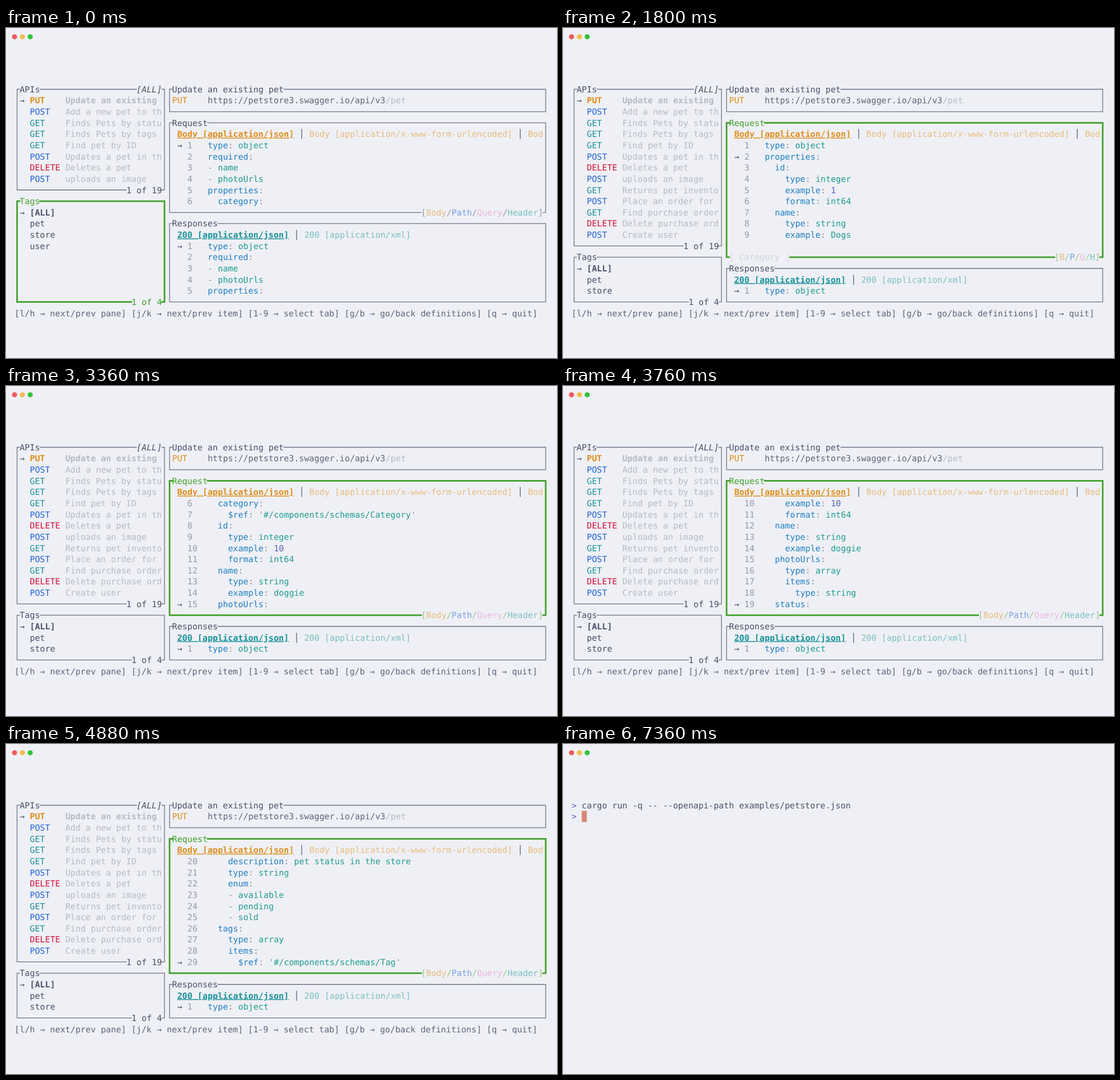
Recreate the animation shown at these times as an HTML page. Size 967 px wide and 579 px high, loop 7.44 s.

```html
<!DOCTYPE html>
<html lang="en">
<head>
<meta charset="utf-8">
<title>OpenAPI terminal browser</title>
<style>
  html, body { margin: 0; width: 100%; height: 100%; overflow: hidden; background: #eff0f5; }
  svg { display: block; width: 967px; height: 579px; }
  text {
    font: 14.816px "DejaVu Sans Mono", monospace;
    white-space: pre;
    text-rendering: geometricPrecision;
  }
  .b { font-weight: bold; }
  .i { font-style: italic; }
  .u { font-weight: bold; text-decoration: underline; }
  path { fill: none; }
</style>
</head>
<body>
<svg viewBox="0 0 967 579">
  <circle cx="15" cy="15.4" r="4.5" fill="#ee5c5a"/>
  <circle cx="28.8" cy="15.4" r="4.5" fill="#f2bd4c"/>
  <circle cx="42.5" cy="15.4" r="4.5" fill="#2fc43c"/>
  <g id="screen"></g>
</svg>
<script>
const LOOP = 7440;
const C = {
  text: '#4c4f69', sub: '#5f627a', line: '#6f7288', dim: '#b7b9c5', num: '#9799a8',
  green: '#40a02b', orange: '#df8e1d', blue: '#2062d8', teal: '#179299', red: '#d20f39',
  key: '#1f80c4', value: '#1f9c90', digit: '#5a63b4', punct: '#7f8c98',
  orangeDim: '#e7bb7c', blueDim: '#769fe2', pinkDim: '#e9b4df', tealDim: '#78bfc1',
  greenDim: '#93c888', grayDim: '#9698a8', ghost: '#d0d2dc', ghostPink: '#e6cfe4',
  prompt: '#5f57bd', cursor: '#d98a78'
};

// Terminal grid
const X = col => +(15 + col * 8.92).toFixed(2);
const Y = row => +(107.5 + row * 19.64).toFixed(2);
const put = (col, row, str, fill = C.text, cls = '') =>
  `<text x="${X(col)}" y="${(Y(row) + 5.3).toFixed(2)}" fill="${fill}" class="${cls}">${str}</text>`;

// Puts [text, colour, class] parts one after the other
function run(col, row, parts) {
  let out = '';
  for (const [str, fill, cls] of parts) {
    if (str) out += put(col, row, str, fill, cls);
    col += str.length;
  }
  return out;
}

const size = parts => parts.reduce((n, p) => n + p[0].length, 0);

// Frame with text set into its edges
function box(c0, r0, c1, r1, title, focus, { top = [], left = [], right = [] } = {}) {
  const color = focus ? C.green : C.line;
  const xa = X(c0 + .5), xb = X(c1 + .5), ya = Y(r0), yb = Y(r1);
  const edge = (y, a, b) =>
    `M${xa} ${y}H${X(c0 + 1)}M${X(c0 + 1 + a)} ${y}H${X(c1 - b)}M${X(c1)} ${y}H${xb}`;
  const d = edge(ya, title.length, size(top)) + edge(yb, size(left), size(right)) +
    `M${xa} ${ya}V${yb}M${xb} ${ya}V${yb}`;
  return `<path d="${d}" stroke="${color}" stroke-width="${focus ? 2.8 : 1.3}" stroke-linecap="square"/>` +
    put(c0 + 1, r0, title, focus ? C.green : C.text) +
    run(c1 - size(top), r0, top) +
    run(c0 + 1, r1, left) +
    run(c1 - size(right), r1, right);
}

const docs = {
  Pet: `type: object
required:
- name
- photoUrls
properties:
  category:
    $ref: '#/components/schemas/Category'
  id:
    type: integer
    example: 10
    format: int64
  name:
    type: string
    example: doggie
  photoUrls:
    type: array
    items:
      type: string
  status:
    description: pet status in the store
    type: string
    enum:
    - available
    - pending
    - sold
  tags:
    type: array
    items:
      $ref: '#/components/schemas/Tag'`,
  Category: `type: object
properties:
  id:
    type: integer
    example: 1
    format: int64
  name:
    type: string
    example: Dogs`,
  Tag: `type: object
properties:
  id:
    type: integer
    format: int64
  name:
    type: string`
};

function yaml(src) {
  const [, pad, dash, key, colon, rest] = src.match(/^( *)(- )?(?:([$\w]+)(:))?(.*)$/);
  const value = rest.trimStart();
  const parts = [[dash || '', C.punct], [key || '', C.key], [colon || '', C.punct]];
  if (value !== rest) parts.push([' ', C.text]);
  if (value[0] === "'") parts.push(["'", C.punct], [value.slice(1, -1), C.value], ["'", C.punct]);
  else parts.push([value, /^\d+$/.test(value) ? C.digit : C.value]);
  return [pad.length, parts];
}

function listing(row, rows, name, sel) {
  const first = Math.max(0, sel - rows);
  return docs[name].split('\n').slice(first, first + rows).map((src, i) => {
    const n = first + i + 1, [pad, parts] = yaml(src);
    return (n === sel ? put(32, row + i, '→') : '') +
      put(34, row + i, String(n), C.num) + run(38 + pad, row + i, parts);
  }).join('');
}

const verbs = { PUT: C.orange, POST: C.blue, GET: C.teal, DELETE: C.red };
const apis = [
  ['PUT', 'Update an existing '], ['POST', 'Add a new pet to th'], ['GET', 'Finds Pets by statu'],
  ['GET', 'Finds Pets by tags'], ['GET', 'Find pet by ID'], ['POST', 'Updates a pet in th'],
  ['DELETE', 'Deletes a pet'], ['POST', 'uploads an image'], ['GET', 'Returns pet invento'],
  ['POST', 'Place an order for '], ['GET', 'Find purchase order'], ['DELETE', 'Delete purchase ord'],
  ['POST', 'Create user']
];

function sidebar(focus) {
  const split = focus ? 9 : 14;
  let out = box(0, 0, 29, split, 'APIs', false, { top: [['[ALL]', C.text, 'i']], right: [['1 of 19', C.text]] });
  out += put(1, 1, '→');
  apis.slice(0, split - 1).forEach(([verb, about], i) => {
    const cls = i ? '' : 'b';
    out += put(3, i + 1, verb, verbs[verb], cls) + put(10, i + 1, about, C.dim, cls);
  });
  out += box(0, split + 1, 29, 19, 'Tags', focus, { right: [['1 of 4', focus ? C.green : C.text]] });
  out += put(1, split + 2, '→');
  ['[ALL]', 'pet', 'store', 'user'].slice(0, 17 - split).forEach((tag, i) => {
    out += put(3, split + 2 + i, tag, C.text, i ? '' : 'b');
  });
  return out;
}

function address(focus) {
  return box(30, 0, 104, 2, 'Update an existing pet', focus) +
    run(31, 1, [['PUT', C.orange], ['    ', C.text], ['https://petstore3.swagger.io/api/v3', C.sub], ['/pet', C.dim]]);
}

function places(short, mark) {
  const names = [['Body', C.orangeDim], ['Path', C.blueDim], ['Query', C.pinkDim], ['Header', C.tealDim]];
  const parts = [];
  names.forEach(([name, color], i) => parts.push([i ? '/' : '[', mark], [short ? name[0] : name, color]));
  return [...parts, [']', mark]];
}

function request(focus, name, sel) {
  const nested = name !== 'Pet', end = focus ? 15 : 11;
  const left = nested ? [['[ ', C.ghostPink], [name, C.ghost, 'i'], [' ]', C.ghostPink]] : [];
  return box(30, 3, 104, end, 'Request', focus, { left, right: places(nested, focus ? C.greenDim : C.grayDim) }) +
    run(32, 4, [
      ['Body [application/json]', C.orange, 'u'], [' │ ', C.text],
      ['Body [application/x-www-form-urlencoded]', C.orangeDim], [' │ ', C.text], ['Bod', C.orangeDim]
    ]) + listing(5, end - 5, name, sel);
}

function responses(top) {
  return box(30, top, 104, 19, 'Responses', false) +
    run(32, top + 1, [
      ['200 [application/json]', C.teal, 'u'], [' │ ', C.text], ['200 [application/xml]', C.tealDim]
    ]) + listing(top + 2, 17 - top, 'Pet', 1);
}

const help = put(0, 20, '[l/h → next/prev pane] [j/k → next/prev item] [1-9 → select tab] ' +
  '[g/b → go/back definitions] [q → quit]', C.sub);

function app(pane, name, sel) {
  const focus = pane === 'request';
  return sidebar(pane === 'tags') + address(pane === 'address') + request(focus, name, sel) +
    responses(focus ? 16 : 12) + help;
}

function shell(ready) {
  const col = ready ? 2 : 0;
  return put(0, 0, '&gt;', C.prompt) + put(2, 0, 'cargo run -q -- --openapi-path examples/petstore.json') +
    (ready ? put(0, 1, '&gt;', C.prompt) : '') +
    `<rect x="${X(col)}" y="${Y(.5)}" width="9" height="19.6" fill="${C.cursor}"/>`;
}

// Time line: [ms, picture]; walk moves one line down at each time
const steps = [];
const at = (ms, draw) => steps.push([ms, draw]);
const walk = (name, line, ...times) =>
  times.forEach((ms, i) => at(ms, () => app('request', name, line + i)));

at(0, () => app('tags', 'Pet', 1));
at(120, () => app('address', 'Pet', 1));
walk('Pet', 1, 320, 400, 520, 600, 720, 800, 880);
walk('Category', 1, 1160, 1800, 1840, 1960);
walk('Pet', 7, 2160, 2680, 2760, 2880, 2960, 3080, 3160, 3280, 3360, 3480, 3560, 3680, 3760,
  3880, 3960, 4080, 4200, 4320, 4440, 4560, 4640, 4760, 4880);
walk('Tag', 1, 5600, 6360, 6480);
walk('Pet', 29, 6600);
at(7320, () => shell(false));
at(7360, () => shell(true));

const screen = document.getElementById('screen');
const start = performance.now();
let shown = -1;

function tick() {
  const t = (performance.now() - start) % LOOP;
  let i = steps.length - 1;
  while (steps[i][0] > t) i--;
  if (i !== shown) screen.innerHTML = steps[shown = i][1]();
  requestAnimationFrame(tick);
}
tick();
</script>
</body>
</html>
```
